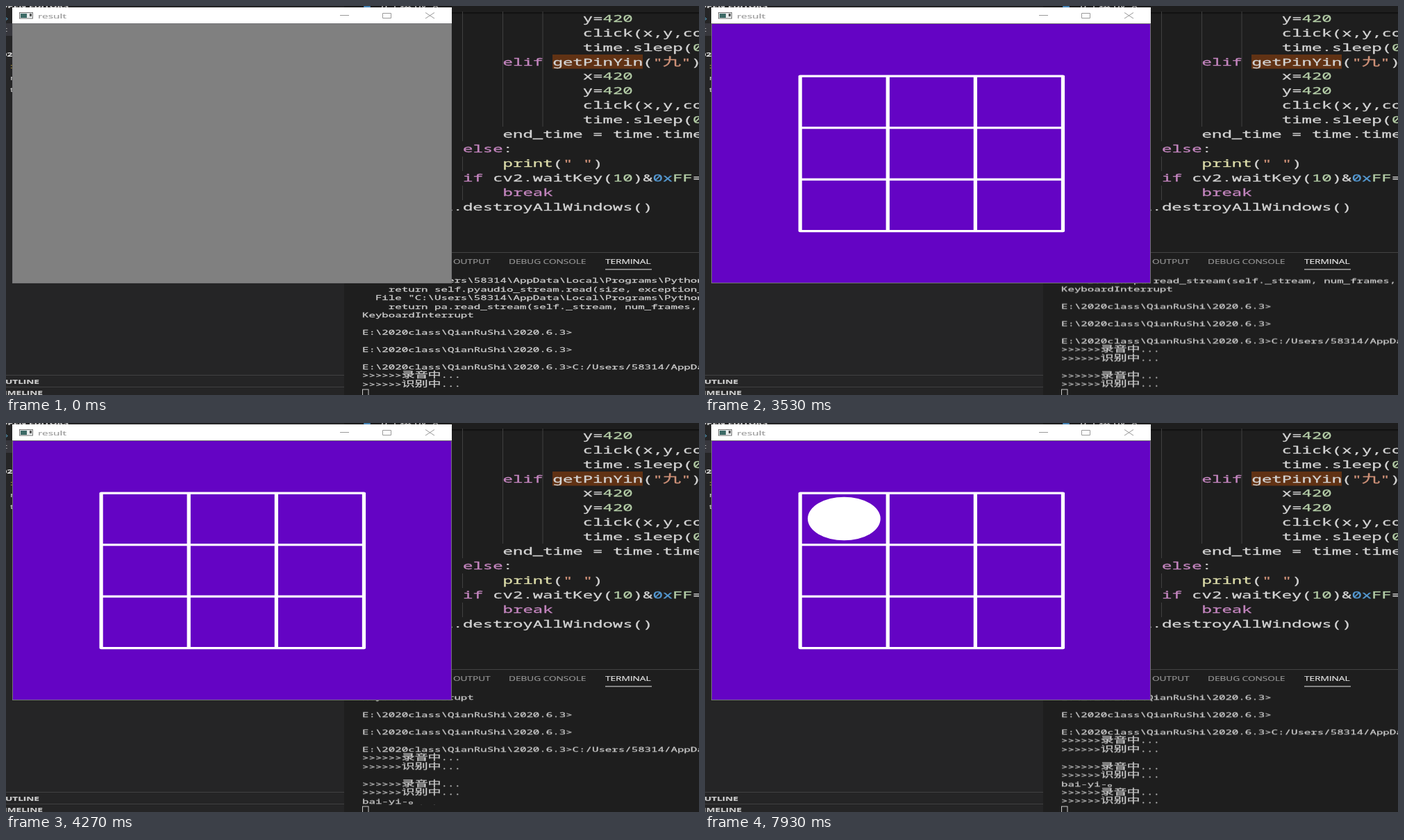
Write an HTML page that moves like this. It is 998 by 561 pixels and loops after 8 s.

```html
<!DOCTYPE html>
<html lang="en">
<head>
<meta charset="utf-8">
<title>Voice board</title>
<style>
  html, body { margin: 0; width: 100%; height: 100%; overflow: hidden; background: #1e1e1e; }
  svg { display: block; width: 100%; height: 100%; }
  text { white-space: pre; stroke-width: .15px; }
  .mono { font-family: "Noto Sans Mono", "Noto Sans CJK SC", monospace; stroke-width: .25px; }
  .ui { font-family: "Open Sans", "Noto Sans CJK SC", sans-serif; }
  .bold { font-weight: 700; }
  .end { text-anchor: end; }

  #log, #board, #disc { animation: 8s step-end infinite; }
  #log { --row: -12.46px; animation-name: scroll; }
  #board { animation-name: board; }
  #disc { animation-name: disc; }
  @keyframes scroll {
    0% { transform: translateY(0); }
    1.625% { transform: translateY(calc(2 * var(--row))); }
    44.125% { transform: translateY(calc(3 * var(--row))); }
    53.375% { transform: translateY(calc(4 * var(--row))); }
    60% { transform: translateY(calc(5 * var(--row))); }
    99.125%, 100% { transform: translateY(calc(6 * var(--row))); }
  }
  @keyframes board { 0% { opacity: 0; } 1.625%, 100% { opacity: 1; } }
  @keyframes disc { 0% { opacity: 0; } 60%, 100% { opacity: 1; } }
</style>
</head>
<body>
<svg viewBox="0 0 998 561" preserveAspectRatio="none">
  <defs>
    <clipPath id="view"><rect x="487" y="390" width="511" height="161"/></clipPath>
    <linearGradient id="shade" x2="0" y2="1">
      <stop stop-color="#0c0c0c"/><stop offset="1" stop-color="#1e1e1e"/>
    </linearGradient>
  </defs>
  <rect width="998" height="561" fill="#1e1e1e"/>

  <g id="sidebar">
    <rect width="487" height="561" fill="#252526"/>
    <rect y="25" width="12" height="18" fill="#37373d"/>
    <path d="M0 532.5H487M0 549.5H487" stroke="#414142"/>
  </g>

  <g id="editor">
    <rect x="487" y="9" width="511" height="3" fill="url(#shade)"/>
    <circle cx="520" cy="0" r="5" fill="#4584b6"/>
    <path d="M657.5 8V195M657.5 217V238M657.5 259V280M715.5 8V174M773 8V174" stroke="#404040"/>
    <rect x="787" y="70" width="130" height="20.5" fill="#613214"/>
  </g>

  <path d="M487 355.5H998" stroke="#444"/>
  <path d="M863 379.9H930" stroke="#e7e7e7"/>
  <g id="panel"></g>
  <g clip-path="url(#view)"><g id="log"></g></g>
  <rect x="513.5" y="553" width="8.5" height="12" fill="none" stroke="#ccc"/>

  <g id="window">
    <rect x="9" y="2" width="633" height="398" fill="#747476"/>
    <rect x="9" y="2" width="633" height="23" fill="#fff"/>
    <rect x="10" y="26" width="631" height="373" fill="#808080"/>
    <rect x="19.5" y="9.5" width="19" height="8.5" fill="#e8ecec" stroke="#777"/>
    <rect x="21" y="11" width="9" height="6" fill="#3c6a66"/>
    <rect x="34" y="11" width="3" height="4" fill="#555"/>
    <path d="M481 13.5H494M542.5 10.5H554.5V17.5H542.5ZM604 9.5L617 18M617 9.5L604 18" fill="none" stroke="#999"/>
    <g id="board">
      <rect x="10" y="26" width="631" height="373" fill="#6404c4"/>
      <path transform="scale(1.64 1)" fill="none" stroke="#fff" stroke-width="3.2" stroke-linecap="round" stroke-linejoin="round"
        d="M83.6 101.1H314.3V324.6H83.6ZM83.6 175.6H314.3M83.6 250.1H314.3M160.5 101.1V324.6M237.4 101.1V324.6"/>
    </g>
    <ellipse id="disc" cx="200.3" cy="138" rx="52.4" ry="31.3" fill="#fff"/>
  </g>
</svg>
<script>
  const NS = 'http://www.w3.org/2000/svg';
  const STRETCH = 1.68; // the whole screen is widened
  const CODE_CELL = 14.4, CODE_ROW = 20.94, TERM_CELL = 9.47, TERM_ROW = 12.46;
  const sizeFor = cell => cell / STRETCH / 0.6;

  function add(parent, name, attrs) {
    const node = document.createElementNS(NS, name);
    for (const key in attrs) node.setAttribute(key, attrs[key]);
    return parent.appendChild(node);
  }

  // runs: [string, colour] pairs; wide characters get their own size
  function label(id, cls, x, y, size, runs, wide = 1) {
    const text = add(document.getElementById(id), 'text', {
      class: cls, 'font-size': size, transform: `translate(${x} ${y}) scale(${STRETCH} 1)`
    });
    for (const [str, fill] of runs)
      for (const part of str.split(/([^\x00-\x7f]+)/).filter(Boolean))
        add(text, 'tspan', { fill, stroke: fill, 'font-size': part > '\x7f' ? size * wide : size }).textContent = part;
  }

  const TOKENS = [
    [/^(elif|else|if|break)$/, '#c586c0'], [/^print$/, '#dcdcaa'], [/^"/, '#ce9178'],
    [/^0x$/, '#569cd6'], [/^(\d+|FF)$/, '#b5cea8']
  ];
  const highlight = line => line
    .split(/(\b(?:elif|else|if|break|print)\b|"[^"]*"|0x|FF|\b\d+\b)/)
    .filter(Boolean)
    .map(s => [s, (TOKENS.find(([re]) => re.test(s)) || [0, '#d4d4d4'])[1]]);

  const click = [[12, 'y=420'], [12, 'click(x,y,color)'], [12, 'time.sleep(0.5)']];
  const code = [
    ...click,
    [4, 'elif getPinYin("九"):'],
    [12, 'x=420'],
    ...click,
    [4, 'end_time = time.time()'],
    [0, 'else:'],
    [4, 'print(" ")'],
    [0, 'if cv2.waitKey(10)&0xFF==27:'],
    [4, 'break'],
    [-4, 'cv2.destroyAllWindows()']
  ];
  code.forEach(([col, line], i) =>
    label('editor', 'mono', 658 + col * CODE_CELL, 22.7 + i * CODE_ROW, sizeFor(CODE_CELL), highlight(line), 1.1));

  const prompt = 'E:\\2020class\\QianRuShi\\2020.6.3>';
  const file = '  File "C:\\Users\\58314\\AppData\\Local\\Programs\\Python\\';
  const record = '>>>>>>录音中...', recognise = '>>>>>>识别中...';
  const log = [
    file, '    return self.pyaudio_stream.read(size, exception_on_overflow)',
    file, '    return pa.read_stream(self._stream, num_frames, exception_on_overflow)',
    'KeyboardInterrupt', '', prompt, '', prompt, '',
    prompt + 'C:/Users/58314/AppData/Local', record, recognise, '',
    record, recognise, 'bai-yi-。', record, recognise
  ];
  log.forEach((line, i) =>
    label('log', 'mono', 513, 399.2 + i * TERM_ROW, sizeFor(TERM_CELL), [[line, '#ccc']], 1.2));

  const ui = (id, cls, x, y, str, fill, size = 8.1) => label(id, 'ui ' + cls, x, y, size, [[str, fill]]);
  ui('panel', '', 644, 372.2, 'OUTPUT', '#959595');
  ui('panel', '', 724, 372.2, 'DEBUG CONSOLE', '#959595');
  ui('panel', '', 863, 372.2, 'TERMINAL', '#e7e7e7');
  ui('sidebar', 'bold end', 90, 3, 'OPEN EDITORS', '#ccc');
  ui('sidebar', 'bold end', 48, 544.5, 'OUTLINE', '#ccc');
  ui('sidebar', 'bold end', 53, 561, 'TIMELINE', '#ccc');
  ui('sidebar', 'bold end', 17, 73, '2020', '#ddd');
  ui('sidebar', '', -1, 21, '›', '#519aba');
  ui('sidebar', 'end', 2, 37, 'c', '#ccc');
  ui('sidebar', '', 6, 90, ':', '#b8a040');
  ui('sidebar', '', 6, 107, 'r', '#ccc');
  ui('sidebar', '', 6, 124, 't', '#ccc');
  ui('editor', '', 536, 3, '五子棋.py  ×', '#ccc', 9.5);
  ui('window', '', 46, 17.5, 'result', '#999', 9.2);
</script>
</body>
</html>
```
